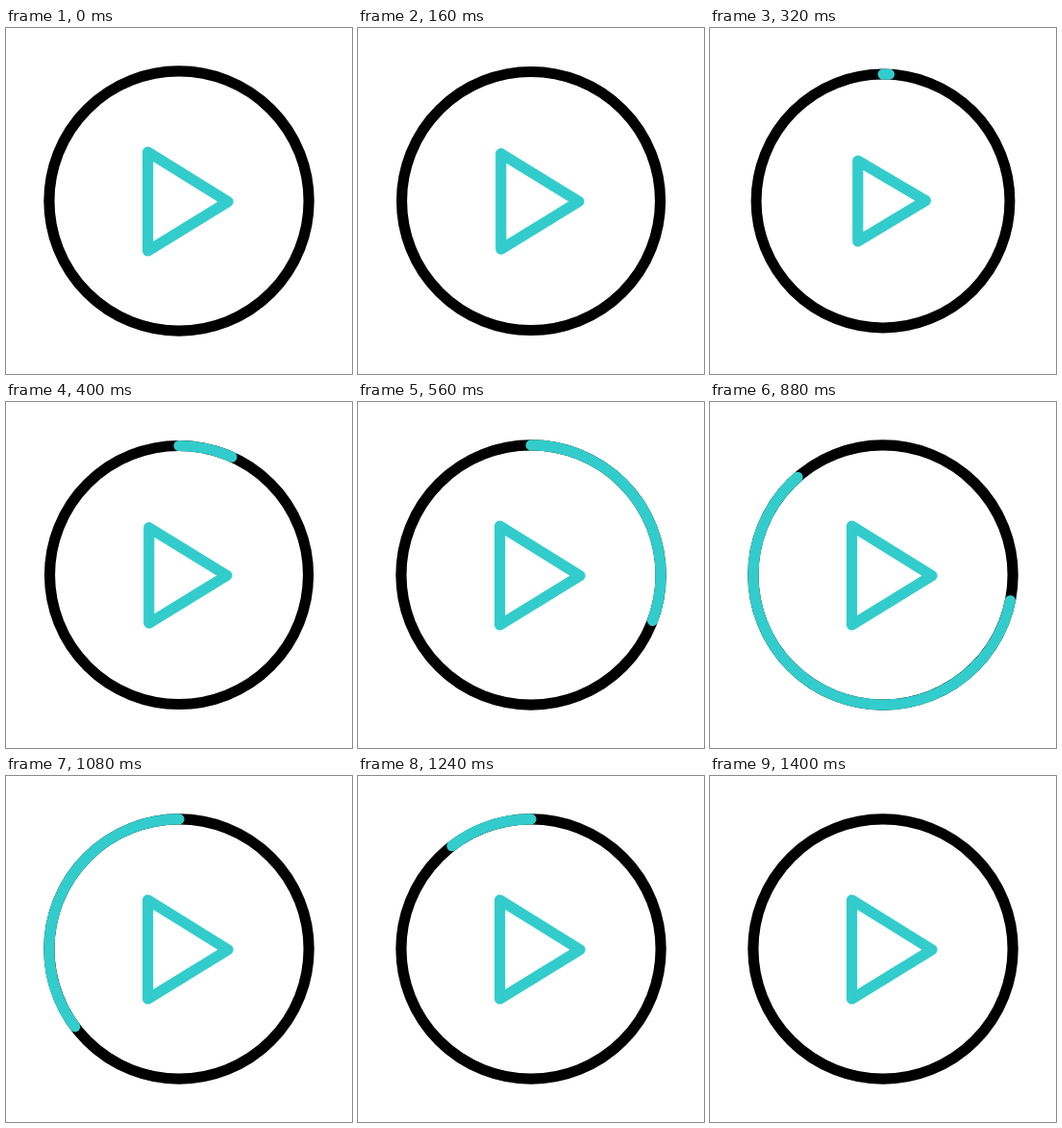
These frames come from a looping animation (360x360 px, 1.48 s). An HTML page:

```html
<!DOCTYPE html>
<html lang="en">
<head>
<meta charset="utf-8">
<title>Play button</title>
<style>
  html, body { margin: 0; width: 100%; height: 100%; overflow: hidden; background: #fff; }
  svg { display: block; width: 100vw; height: 100vh; }
  svg * { fill: none; stroke-width: 11.2; stroke-linecap: round; stroke-linejoin: round; }
  #ring { stroke: #000; }
  #arc, #play { stroke: #3cc; }
</style>
</head>
<body>
<svg viewBox="-180 -180 360 360">
  <g id="dial">
    <circle id="ring" r="135.1"/>
    <circle id="arc" r="135.1" pathLength="360" transform="rotate(-90)" visibility="hidden"/>
  </g>
  <polygon id="play"/>
</svg>
<script>
  const LOOP = 1480, STEP = 40;
  const REST = [-32.4, -51, -32.4, 52, 51, 0.7];
  const PRESSED = [-25, -40.2, -25, 40.2, 43.1, -0.6];
  const [dial, arc, play] = ['dial', 'arc', 'play'].map(id => document.getElementById(id));

  // Smooth ease from 0 to 1 between two times
  function ease(t, from, to) {
    const s = Math.min(1, Math.max(0, (t - from) / (to - from)));
    return s * s * (3 - 2 * s);
  }

  function draw(t) {
    const press = ease(t, 120, 280) - ease(t, 280, 440);
    const start = 360 * ease(t, 600, 1400);
    const end = 360 * ease(t, 280, 1040);

    dial.setAttribute('transform', `scale(${1 - 0.028 * press})`);
    arc.setAttribute('stroke-dasharray', `${end - start} 360`);
    arc.setAttribute('stroke-dashoffset', -start);
    arc.setAttribute('visibility', end > start ? 'visible' : 'hidden');
    play.setAttribute('points', REST.map((v, i) => v + (PRESSED[i] - v) * press).join(' '));
  }

  const origin = performance.now();

  function tick() {
    const t = (performance.now() - origin) % LOOP;
    draw(Math.floor(t / STEP) * STEP);
    requestAnimationFrame(tick);
  }
  tick();
</script>
</body>
</html>
```
